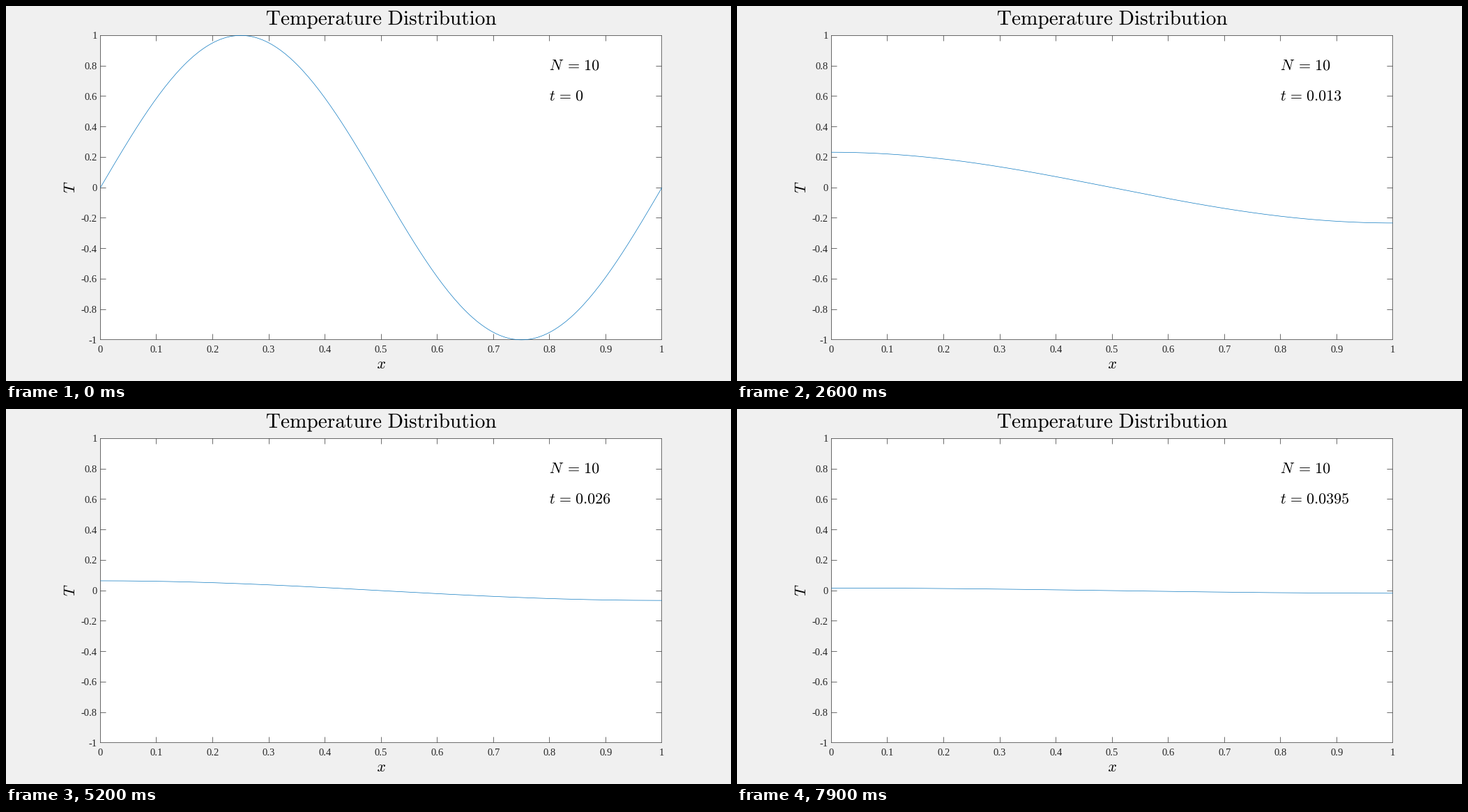
Recreate the animation shown at these times as a matplotlib script. Size 1040x539 px, loop 8 s.

```python
import numpy as np
import matplotlib.pyplot as plt
from matplotlib.animation import FuncAnimation
from matplotlib.patches import PathPatch, Rectangle
from matplotlib.path import Path
from matplotlib.textpath import TextPath

W, H, DPI = 1040, 539, 64
PT = 72 / DPI                       # points per pixel
FRAMES, INTERVAL = 80, 100
DT, ALPHA = 0.0005, 10              # time step, diffusivity
GAIN = 0.988                        # small loss at the first step
LEFT, RIGHT, TOP, BOTTOM = 135.4, 940.9, 42.3, 479.8
INK = "#262626"
THIN = 0.67 * PT
SIZE = 22                           # label size in pixels

plt.rcParams["mathtext.fontset"] = "cm"

fig = plt.figure(figsize=(W / DPI, H / DPI), dpi=DPI, facecolor="#f0f0f0")
ax = fig.add_axes([0, 0, 1, 1])
ax.set_xlim(0, W)
ax.set_ylim(H, 0)
ax.axis("off")


def px(x):
    return LEFT + (RIGHT - LEFT) * x


def py(y):
    return (TOP + BOTTOM) / 2 - (BOTTOM - TOP) / 2 * y


def mid(v):
    return np.floor(v) + 0.5


def math_path(s, x, y, size=SIZE, center=False, upright=False):
    """Outline of a formula with its baseline at pixel (x, y)."""
    path = TextPath((0, 0), f"${s}$", size=size)
    verts = path.vertices.copy()
    if center:
        box = path.get_extents()
        verts[:, 0] -= (box.x0 + box.x1) / 2
    if upright:
        verts = np.column_stack([-verts[:, 1], -verts[:, 0]])
    else:
        verts[:, 1] *= -1
    return Path(verts + [x, y], path.codes)


def math_text(*args, **kw):
    patch = PathPatch(math_path(*args, **kw), fc="black", lw=0, zorder=4)
    return ax.add_patch(patch)


def rule(xs, ys):
    ax.plot(xs, ys, color=INK, lw=THIN, snap=False, solid_capstyle="butt")


def equation(sym, width, y):
    """Draw 'sym =' and return where the value starts."""
    x = px(0.8)
    math_text(sym, x, y)
    math_text("=", x + (width + 0.278 + 0.389) * SIZE, y, center=True)
    return x + (width + 1.333) * SIZE


# axes box, ticks and tick labels
l, r, t, b = mid(LEFT), mid(RIGHT), mid(TOP), mid(BOTTOM)
ax.add_patch(Rectangle((l, t), r - l, b - t, fc="white", lw=0))
rule([l - 0.5, r + 0.5], [t, t])
rule([l - 0.5, r + 0.5], [b, b])
rule([l, l], [t, b])
rule([r, r], [t, b])

label = dict(family="Liberation Serif", fontsize=14.67 * PT, color=INK,
             va="baseline")
for i in range(11):
    x, y = px(i / 10), py(i / 5 - 1)
    ax.text(x, 498, f"{i / 10:g}", ha="center", **label)
    ax.text(130.7, y + 5, f"{round(i / 5 - 1, 1):g}".replace("\u2212", "-"),
            ha="right", **label)
    if 0 < i < 10:
        x, y = mid(x), mid(y)
        rule([x, x], [t, t + 8])
        rule([x, x], [b - 8, b])
        rule([l, l + 8], [y, y])
        rule([r - 8, r], [y, y])

math_text(r"\mathrm{Temperature\ Distribution}", 538.5, 27, size=29.33,
          center=True)
math_text("x", 538.5, 521, center=True)
math_text("T", 98, 261, center=True, upright=True)

value_x = equation("N", 0.912, 92.2)
math_text(r"\mathrm{10}", value_x, 92.2)
time_x = equation("t", 0.361, 135.9)
clock = math_text(r"\mathrm{0}", time_x, 135.9)

grid = np.linspace(0, 1, 201)
curve, = ax.plot(px(grid), py(0 * grid), color="#0072BD", lw=THIN, zorder=3,
                 snap=False, solid_capstyle="butt")


def temperature(time):
    """Insulated rod that starts as one sine wave."""
    if time == 0:
        return np.sin(2 * np.pi * grid)
    total = 0 * grid
    for n in range(1, 40, 2):
        coef = 8 / (np.pi * (4 - n * n))
        decay = np.exp(-ALPHA * (n * np.pi) ** 2 * time)
        total += coef * decay * np.cos(n * np.pi * grid)
    return GAIN * total


def update(k):
    time = round(k * DT, 4)
    curve.set_ydata(py(temperature(time)))
    clock.set_path(math_path(rf"\mathrm{{{time:g}}}", time_x, 135.9))
    return curve, clock


anim = FuncAnimation(fig, update, frames=FRAMES, interval=INTERVAL,
                     repeat=True, repeat_delay=0)
plt.show()
```
